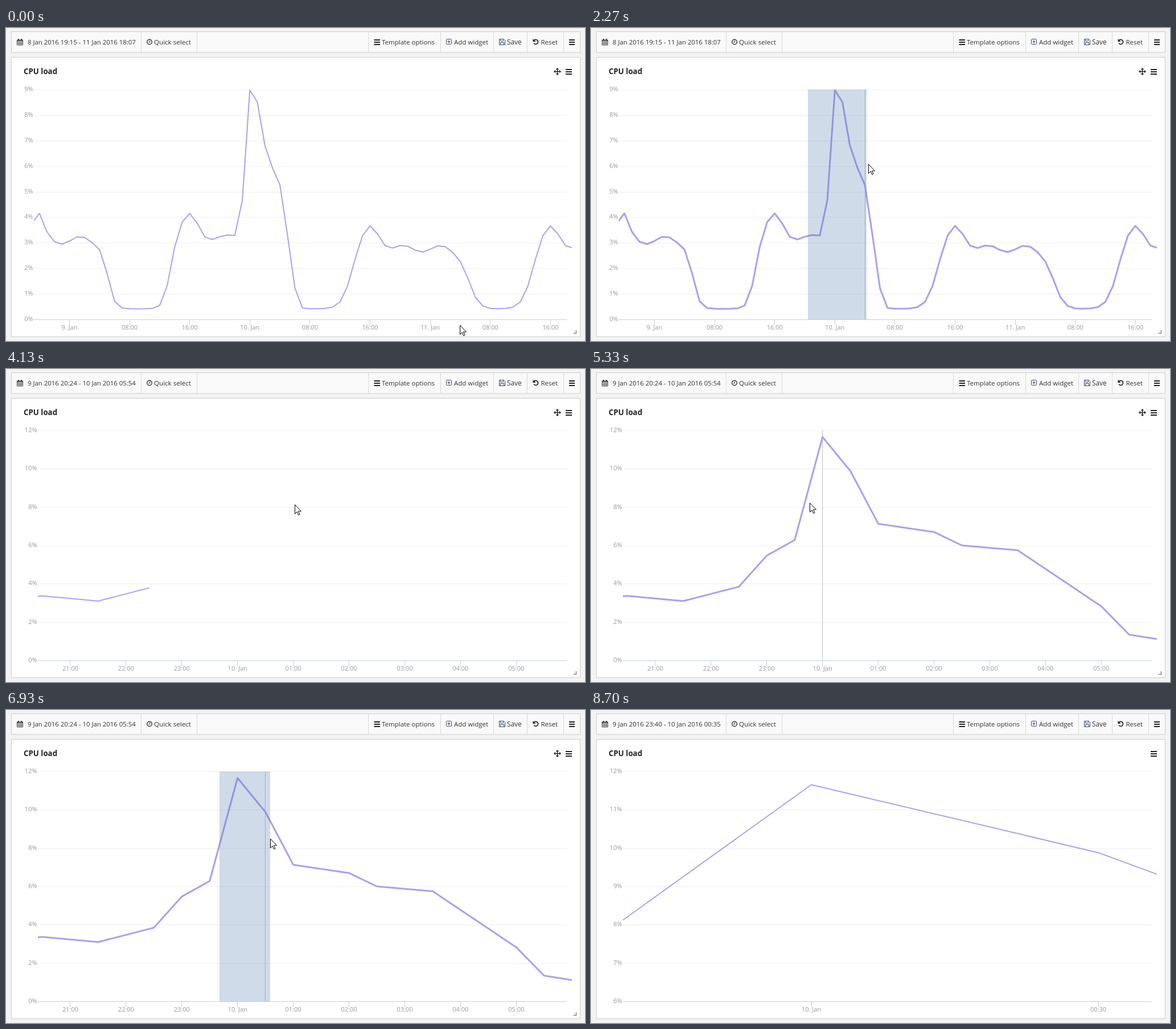
An HTML page for the animation above (9130 ms loop, 1017x550 px).

```html
<!DOCTYPE html>
<html lang="en">
<head>
<meta charset="utf-8">
<title>CPU load</title>
<style>
  html, body { margin: 0; width: 100%; height: 100%; overflow: hidden; background: #f3f3f3; }
  svg { display: block; width: 1017px; height: 550px; font-family: "Open Sans", sans-serif; }
  .tool { fill: #333; }
  .axis { font-size: 11px; fill: #999; }
</style>
</head>
<body>
<svg id="stage" viewBox="0 0 1017 550"></svg>
<script>
const LOOP = 9130;
const TOP = 108, BOTTOM = 512, RIGHT = 985, EDGE = 994;
const REVEAL = 860;

// Hours count from 9 Jan 00:00; midnight is the x of hour 24.
const scenes = [
  { date: '8 Jan 2016 19:15 - 11 Jan 2016 18:07', start: -REVEAL, left: 49, midnight: 428.3,
    hourWidth: 13.2, sampleStep: 1, tickStep: 8, min: 0, max: 9, rowStep: 1 },
  { date: '9 Jan 2016 20:24 - 10 Jan 2016 05:54', start: 3870, left: 56, midnight: 406.7,
    hourWidth: 97.9, sampleStep: 0.5, tickStep: 1, min: 0, max: 12, rowStep: 2 },
  { date: '9 Jan 2016 23:40 - 10 Jan 2016 00:35', start: 7370, left: 56, midnight: 387,
    hourWidth: 1008, sampleStep: 0.5, tickStep: 0.5, min: 6, max: 12, rowStep: 1 }
];

// Shape of the nightly burst: hour, load in percent.
const burst = [
  [20.5, 3.37], [21.5, 3.1], [22.5, 3.85], [23, 5.47], [23.5, 6.28], [24, 11.65], [24.5, 9.88],
  [25, 7.13], [26, 6.7], [26.5, 6], [27.5, 5.75], [29, 2.83], [29.5, 1.35], [30, 1.12]
];

// Pointer moves: start, end, x, y.
const moves = [
  [50, 230, 808, 528], [340, 1070, 381, 247], [1430, 3170, 507, 238], [4500, 5500, 375, 235],
  [5830, 6670, 464, 227], [6900, 6930, 464, 226], [8260, 8700, 452, 552]
];

const clamp = v => Math.max(0, Math.min(1, v));
const swing = p => 0.5 - Math.cos(clamp(p) * Math.PI) / 2;
const easeOut = p => 1 - (1 - clamp(p)) ** 2.8;
const sigmoid = v => 1 / (1 + Math.exp(-v));
const bump = v => Math.exp(-v * v);
const snap = v => Math.floor(v) + 0.5;
const within = (t, a, b) => t >= a && t < b;

// Daily cycle: idle mornings, an afternoon rise with a peak, a rippled evening.
function dailyLoad(hour) {
  const day = Math.floor((hour - 8) / 24), u = hour - 8 - day * 24;
  const busy = day < 1, slope = busy ? 2.4 : 1.6;
  const active = sigmoid(slope * (u - 5.3)) - sigmoid(slope * (u - 21.05));
  const ripple = 0.14 * Math.cos(2 * Math.PI * (u - 12.4) / 5);
  const day0Peak = 1.05 * bump(hour + 4.3);
  return 0.42 + (busy ? 1.14 : 1) * ((2.35 + ripple) * active + 0.85 * bump((u - 8.1) / 1.7)) + day0Peak;
}

function load(hour) {
  const i = burst.findIndex(([h]) => h >= hour);
  if (i < 0 || hour < burst[0][0]) return dailyLoad(hour + 0.25);
  if (!i) return burst[0][1];
  const [h0, v0] = burst[i - 1], [h1, v1] = burst[i];
  return v0 + (v1 - v0) * (hour - h0) / (h1 - h0);
}

// Hourly samples average the two half hours.
const sampled = (hour, step) => step === 1 ? (load(hour) + load(hour - 0.5)) / 2 : load(hour);

function hourLabel(hour) {
  if (hour % 24 === 0) return `${9 + hour / 24}. Jan`;
  const pad = v => String(v).padStart(2, '0');
  return `${pad(Math.floor(hour) % 24)}:${pad(hour % 1 * 60)}`;
}

const path = (d, stroke, width = 1) =>
  `<path d="${d}" fill="none" stroke="${stroke}" stroke-width="${width}"/>`;
const text = (x, y, size, label, more = 'class="tool"') =>
  `<text x="${x}" y="${y}" font-size="${size}" ${more}>${label}</text>`;
const bars = (x, y, w) => path(`M${x} ${y}h${w}m${-w} 4h${w}m${-w} 4h${w}`, '#222', 2);

function toolbar() {
  const dividers = [237, 335, 636, 763, 856, 915, 979].map(x => `M${x + 0.5} 7v36`).join('');
  return `
    <rect x="9.5" y="6.5" width="999" height="36.5" fill="#f9f9f9" stroke="#ccc"/>
    ${path(dividers, '#d8d8d8')}
    ${path('M19.5 21.5h10v8.5h-10zM20 24.5h9M20 27.3h9M23 24v6M26.5 24v6', '#444')}
    ${path('M19 21.800h11M22 19v3.500M27 19v3.500', '#333', 2)}
    ${text(38, 29, 11.4, '', 'class="tool" id="date"')}
    <circle cx="252" cy="24.5" r="4.3" fill="none" stroke="#333" stroke-width="1.4"/>
    ${path('M252.5 22v3h-2.5', '#333')}
    ${text(260, 29, 11.6, 'Quick select')}
    ${bars(646.5, 21, 10.5)}
    ${text(660, 29, 11.5, 'Template options')}
    <rect x="773.5" y="19.5" width="9" height="9" rx="1" fill="none" stroke="#3d4d66"/>
    ${path('M775.5 24h5M778 21.5v5', '#3d4d66', 1.2)}
    ${text(787, 29, 11.5, 'Add widget')}
    ${path('M866.5 19.5h8l2 2v8h-10zM868.5 19.5v3.5h5v-3.5M868.5 29.5v-4h6v4', '#3d4d66')}
    ${text(880, 29, 11.8, 'Save')}
    ${path('M927.5 21.5a4.1 4.1 0 1 1 -.4 5.300', '#222', 1.7)}
    <path d="M925.5 19v5h5z" fill="#222"/>
    ${text(939.5, 29, 11.5, 'Reset')}
    ${bars(989, 21, 10)}`;
}

function chart(s) {
  const xOf = hour => s.midnight + (hour - 24) * s.hourWidth;
  const hourAt = x => 24 + (x - s.midnight) / s.hourWidth;
  const yOf = v => 107.7 + 404.6 * (s.max - v) / (s.max - s.min);
  let grid = '', tickMarks = '', labels = '';

  for (let v = s.max; v >= s.min; v -= s.rowStep) {
    const y = Math.round(yOf(v));
    if (v > s.min) grid += `M${s.left} ${y + 0.5}H${RIGHT}`;
    labels += text(s.left - 1.5, y + 3, 11, `${v}%`, 'class="axis" text-anchor="end"');
  }
  const firstTick = Math.ceil(hourAt(s.left) / s.tickStep) * s.tickStep;
  for (let h = firstTick; xOf(h) < RIGHT; h += s.tickStep) {
    tickMarks += `M${snap(xOf(h))} 512v10`;
    labels += text(xOf(h), 530, 11, hourLabel(h), 'class="axis" text-anchor="middle"');
  }

  const points = [];
  const first = Math.floor(hourAt(s.left) / s.sampleStep) * s.sampleStep;
  for (let h = first; h < hourAt(EDGE) + s.sampleStep; h += s.sampleStep) {
    points.push([xOf(h), yOf(sampled(h, s.sampleStep))]);
  }
  s.xs = points.map(p => p[0]).filter(x => x >= s.left && x <= EDGE);

  return `<g class="scene">
    ${path(grid, '#f0f0f0')}
    ${path(`M${s.left} 512.5H${RIGHT}${tickMarks}`, '#c0d0e0')}
    ${labels}
    <path class="hair" fill="none" stroke="#c0c0c0"/>
    <polyline points="${points.join(' ')}" fill="none" stroke="#a9a1ec" stroke-linejoin="round" clip-path="url(#reveal)"/>
  </g>`;
}

const stage = document.getElementById('stage');
stage.innerHTML = `
  <defs><clipPath id="reveal"><rect id="mask" y="100" height="420"/></clipPath></defs>
  <rect width="1017" height="550" fill="#f3f3f3"/>
  ${toolbar()}
  <rect x="9.5" y="51.5" width="999" height="491" fill="#fff" stroke="#ccc"/>
  ${text(31, 80.7, 13.3, 'CPU load', 'fill="#222" font-weight="700"')}
  ${bars(983, 73, 11)}
  <g id="handles">
    ${path('M964 76.5h9M968.5 72v9', '#222', 1.6)}
    <path d="M962 76.5l3-2.8v5.6zM975 76.5l-3-2.8v5.6zM968.5 70l-2.8 3h5.6zM968.5 83l-2.8-3h5.6z" fill="#222"/>
    ${path('M1001.5 531v5.5h-5', '#888', 1.5)}
  </g>
  ${scenes.map(chart).join('')}
  <rect id="drag" y="${TOP}" height="${BOTTOM - TOP}" fill="rgb(69,114,167)" fill-opacity=".25"/>
  <path id="pointer" d="M.5 .5v16l3.7-3.600 2.5 5.7 2.3-1-2.5-5.600h5z" fill="#fff" stroke="#000"/>`;

const find = id => document.getElementById(id);
const date = find('date'), mask = find('mask'), handles = find('handles');
const drag = find('drag'), pointer = find('pointer');
const groups = [...document.querySelectorAll('.scene')];
const show = (el, on) => el.setAttribute('visibility', on ? 'visible' : 'hidden');

function pointerAt(t) {
  let x = 797, y = 522;
  for (const [start, end, toX, toY] of moves) {
    const ease = start === 1430 ? easeOut : swing;
    const p = ease((t - start) / (end - start));
    x += (toX - x) * p;
    y += (toY - y) * p;
  }
  return [Math.round(x), Math.round(y)];
}

function render(t) {
  const index = t < 3670 ? 0 : t < 7370 ? 1 : 2;
  const scene = scenes[index], group = groups[index];
  const [x, y] = pointerAt(t);
  const firstDrag = within(t, 1430, 3670), secondDrag = within(t, 5870, 7370);
  // The first selection starts slower than the pointer and catches up.
  const focus = firstDrag ? Math.min(x, 381 + 126 * swing((t - 1430) / 1170)) : x;
  const active = within(t, 370, 3670) || within(t, 4600, 7370) || within(t, 8300, 8700);
  const hover = active && y >= TOP && y < BOTTOM;

  date.textContent = scene.date;
  show(handles, y < 543);
  groups.forEach((g, i) => { g.style.display = i === index && t >= scene.start ? '' : 'none'; });

  const progress = (t - scene.start) / REVEAL;
  const width = progress >= 1 ? EDGE - scene.left : (RIGHT - scene.left) * swing(progress);
  mask.setAttribute('x', scene.left);
  mask.setAttribute('width', width);

  const nearest = scene.xs.reduce((a, b) => Math.abs(b - focus) < Math.abs(a - focus) ? b : a);
  group.querySelector('.hair').setAttribute('d', hover ? `M${snap(nearest)} ${TOP}V${BOTTOM}` : '');
  group.querySelector('polyline').setAttribute('stroke-width', hover ? 3 : 2);

  const from = firstDrag ? 381 : 375;
  show(drag, firstDrag || secondDrag);
  drag.setAttribute('x', from);
  drag.setAttribute('width', Math.max(0, focus - from));
  pointer.setAttribute('transform', `translate(${x} ${y})`);
}

function frame() {
  render(performance.now() % LOOP);
  requestAnimationFrame(frame);
}
frame();
</script>
</body>
</html>
```
